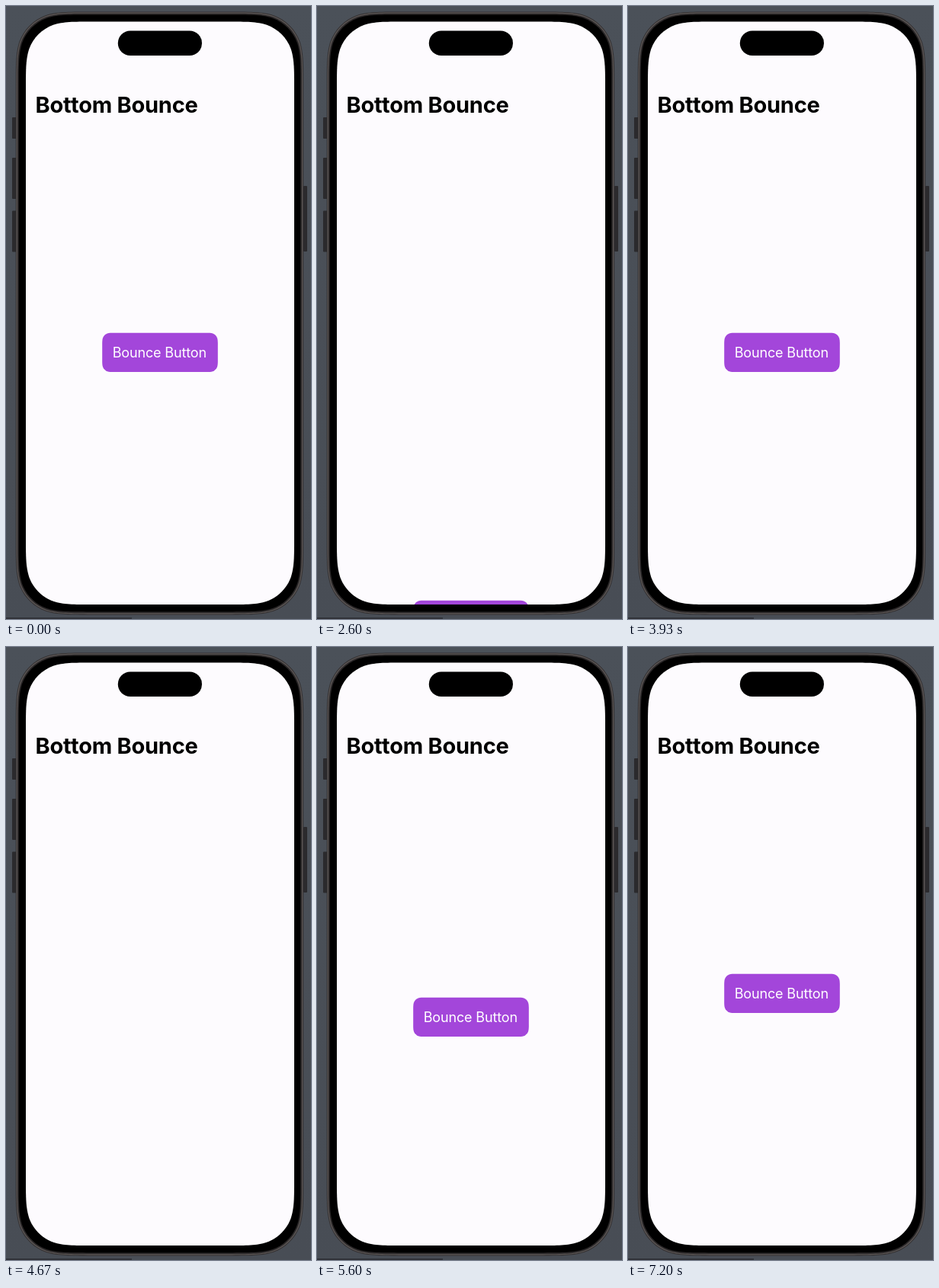
Write an HTML page that moves like this. It is 400 px wide and 804 px high and loops after 7270 ms.

```html
<!DOCTYPE html>
<html lang="en">
<head>
<meta charset="utf-8">
<title>Bottom Bounce</title>
<style>
  html, body { margin: 0; width: 100%; height: 100%; overflow: hidden; background: #4b5057; }
  svg { display: block; width: 400px; height: 804px; }
  text { font-family: Inter, "Liberation Sans", sans-serif; }
  .title { font-size: 29px; font-weight: 700; letter-spacing: -0.25px; fill: #000; }
  .label { font-size: 18px; font-weight: 400; letter-spacing: -0.15px; fill: #fff; }
</style>
</head>
<body>
<svg viewBox="0 0 400 804" xmlns="http://www.w3.org/2000/svg">
  <defs>
    <linearGradient id="bg" x1="0" y1="0" x2="0" y2="1">
      <stop offset="0" stop-color="#4b5159"/>
      <stop offset="1" stop-color="#484d55"/>
    </linearGradient>
    <clipPath id="clip"><path data-box="26 20.5 352 764.5 57"/></clipPath>
  </defs>
  <rect width="400" height="804" fill="url(#bg)"/>
  <rect y="802" width="165" height="2" fill="#303238"/>

  <g fill="#2b2a2d">
    <rect x="8" y="146" width="6" height="28" rx="1"/>
    <rect x="8" y="199" width="6" height="54" rx="1"/>
    <rect x="8" y="268.5" width="6" height="54" rx="1"/>
    <rect x="390" y="236" width="5" height="86" rx="1"/>
  </g>

  <path data-box="12.8 7.6 377.4 790.8 62" fill="#343132"/>
  <path data-box="13.8 8.6 375.4 788.8 61" fill="#5d5857"/>
  <path data-box="15 9.8 373 786.4 60" fill="#2b2829"/>
  <path data-box="16.8 11.6 369.4 782.8 58" fill="#000"/>
  <path data-box="26 20.5 352 764.5 57" fill="#fdfbfe"/>
  <rect x="146.8" y="32.6" width="110.2" height="32.4" rx="16.2"/>
  <text class="title" x="38.6" y="139.5">Bottom Bounce</text>

  <g clip-path="url(#clip)">
    <g id="button">
      <path data-box="126.2 428.8 151.6 51.2 10.5" fill="#a346da"/>
      <text class="label" x="139.7" y="461.2">Bounce Button</text>
    </g>
  </g>
</svg>
<script>
  const LOOP = 7270;
  const HIDDEN = 380;

  // Rounded box with continuous-curvature corners
  function roundBox(x, y, w, h, r) {
    const corner = [
      [1.5287, 0], [1.0885, 0], [0.8684, 0], [0.6315, 0.0749],
      [0.3728, 0.1691], [0.1691, 0.3728], [0.0749, 0.6315],
      [0, 0.8684], [0, 1.0885], [0, 1.5287]
    ];
    const place = (right, bottom, reverse) => {
      const pts = corner.map(([a, b]) => [
        right ? x + w - a * r : x + a * r,
        bottom ? y + h - b * r : y + b * r
      ]);
      if (reverse) pts.reverse();
      return pts[0] + " C" + pts.slice(1).join(" ");
    };
    return "M" + [
      place(false, false, true), place(true, false, false),
      place(true, true, true), place(false, true, false)
    ].join(" L") + "Z";
  }

  for (const el of document.querySelectorAll("[data-box]")) {
    el.setAttribute("d", roundBox(...el.dataset.box.split(" ").map(Number)));
  }

  // [time in ms, distance below the resting place]
  const steps = [
    [0, 0],
    [1870, HIDDEN],
    [2600, 351], [2670, 130], [2730, 31], [2800, 0],
    [4670, HIDDEN],
    [5530, 130], [5600, 31], [5670, 0],
    [LOOP, 0]
  ];

  document.getElementById("button").animate(
    steps.map(([time, y]) => ({
      offset: time / LOOP,
      transform: `translateY(${y}px)`,
      easing: "steps(1, end)"
    })),
    { duration: LOOP, iterations: Infinity }
  );
</script>
</body>
</html>
```
